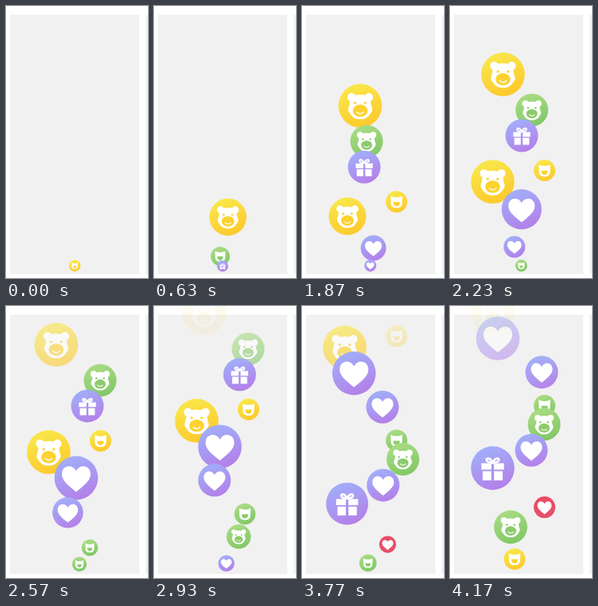
An HTML page for the animation above (4210 ms loop, 178x340 px).

```html
<!DOCTYPE html>
<html lang="en">
<head>
<meta charset="utf-8">
<title>Floating likes</title>
<style>
  html, body { margin: 0; width: 100%; height: 100%; overflow: hidden; background: #fff; }
  svg { display: block; width: 100vw; height: 100vh; }
</style>
</head>
<body>
<svg viewBox="0 0 178 340">
  <defs>
    <g id="bear">
      <g fill="#fff">
        <circle cx="-.4" cy="-.39" r=".19"/>
        <circle cx=".4" cy="-.39" r=".19"/>
        <path d="M-.38-.44Q0-.58.38-.44Q.5-.2.5 0Q.62.2.48.34Q.34.62 0 .62Q-.34.62-.48.34Q-.62.2-.5 0Q-.5-.2-.38-.44Z"/>
      </g>
      <g fill="currentColor">
        <circle cx="-.23" cy="-.13" r=".06"/>
        <circle cx=".23" cy="-.13" r=".06"/>
        <ellipse cy=".23" rx=".34" ry=".28"/>
      </g>
      <path fill="none" stroke="#fff" stroke-width=".05" d="M-.17.28Q0 .46.17.28"/>
    </g>
    <g id="cub">
      <path fill="#fff" d="M-.54-.54L-.3-.44Q0-.38.3-.44L.54-.54L.52.2Q.46.58 0 .58Q-.46.58-.52.2Z"/>
      <path fill="currentColor" d="M-.3.02H.3Q.3.42 0 .42Q-.3.42-.3.02Z"/>
    </g>
    <g id="gift">
      <path fill="#fff" d="M-.52-.22H-.06V.07H-.52ZM.06-.22H.52V.07H.06ZM-.46.14H-.06V.56H-.46ZM.06.14H.46V.56H.06Z"/>
      <path fill="none" stroke="#fff" stroke-width=".1" d="M0-.24C-.1-.5-.32-.48-.28-.35Q-.24-.26 0-.24C.1-.5.32-.48.28-.35Q.24-.26 0-.24Z"/>
    </g>
    <path id="heart" fill="#fff" d="M0 .64C-.22.46-.66.16-.66-.16C-.66-.6-.17-.66 0-.32C.17-.66.66-.6.66-.16C.66.16.22.46 0 .64Z"/>
  </defs>
  <path fill="#f1f1f1" d="M5 11H167V335H5ZM175 11H178V335H175Z"/>
  <g id="stage"></g>
</svg>
<script>
const LOOP = 4210, GROW = 800, SPEED = 0.109, START_R = 7;
const FLOOR = 332, FADE_END = 3000, FADE_TIME = 700, START_X = 86;
const BIG = 27.3, MID = 20.5, SMALL = 13.5;

// gradient start, gradient end, detail color
const colors = {
  yellow: ['#f9e84a', '#fdc82c', '#fdd230'],
  green: ['#aadc84', '#80c766', '#8ccb6c'],
  purple: ['#a0b0fa', '#b47ee8', '#a893f0'],
  red: ['#ec4a62', '#e5506c', '#e84d66']
};

// icon, color, full radius, birth time, then [age, x] points of the sideways drift
const likes = [
  ['bear', 'yellow', BIG, -10, [[620, 92.5], [820, 93], [1130, 86], [1880, 73], [2580, 63]]],
  ['bear', 'green', MID, 336, [[300, 83], [795, 78], [1535, 81], [2235, 118]]],
  ['gift', 'purple', MID, 630, [[500, 79.5], [1240, 78], [1940, 102], [2700, 109]]],
  ['bear', 'yellow', SMALL, 965, [[170, 95.5], [905, 118.5]]],
  ['bear', 'yellow', BIG, 1222, [[648, 57], [1000, 53.5]]],
  ['heart', 'purple', BIG, 1518, [[352, 89.5], [1052, 88], [1812, 75], [2652, 60]]],
  ['heart', 'purple', MID, 1842, [[728, 77.5], [1488, 79.5], [2328, 115]]],
  ['bear', 'green', SMALL, 2162, [[408, 105], [1168, 118.5]]],
  ['bear', 'green', MID, 2440, [[130, 92], [890, 120], [1326, 126.5], [1730, 118]]],
  ['heart', 'purple', MID, 2738, [[592, 99], [1432, 102]]],
  ['gift', 'purple', BIG, 3005, [[320, 71], [1000, 53.5]]],
  ['heart', 'red', SMALL, 3328, [[840, 118.5]]],
  ['bear', 'green', BIG, 3622, [[540, 76]]],
  ['bear', 'yellow', BIG, 3920, [[240, 81]]]
];

const svgNode = (tag, attrs, parent) => {
  const node = document.createElementNS('http://www.w3.org/2000/svg', tag);
  for (const key in attrs) node.setAttribute(key, attrs[key]);
  return parent.appendChild(node);
};
const clamp01 = v => Math.max(0, Math.min(1, v));

const defs = document.querySelector('defs');
for (const name in colors) {
  const grad = svgNode('linearGradient', { id: name, x1: 0.3, y1: 0, x2: 0.7, y2: 1 }, defs);
  svgNode('stop', { offset: 0, 'stop-color': colors[name][0] }, grad);
  svgNode('stop', { offset: 1, 'stop-color': colors[name][1] }, grad);
}

const stage = document.getElementById('stage');
const bubbles = likes.map(([icon, color, size, birth, drift]) => {
  const node = svgNode('g', { color: colors[color][2] }, stage);
  svgNode('circle', { r: 1, fill: `url(#${color})` }, node);
  const face = svgNode('use', { href: '#' + icon }, node);
  return { icon, size, birth, node, face, points: [[0, START_X], ...drift] };
});

// Smooth curve through the points, level at the far end
function driftX(points, age) {
  const last = points.length - 1;
  if (age >= points[last][0]) return points[last][1];
  if (age <= 0) return points[0][1];
  const i = points.findIndex(p => p[0] > age) - 1;
  const slope = k => {
    if (k === last) return 0;
    const a = points[Math.max(0, k - 1)], b = points[k + 1];
    return (b[1] - a[1]) / (b[0] - a[0]);
  };
  const [t0, x0] = points[i], [t1, x1] = points[i + 1];
  const span = t1 - t0, u = (age - t0) / span, v = 1 - u;
  return v * v * (1 + 2 * u) * x0 + u * u * (3 - 2 * u) * x1
    + span * u * v * (v * slope(i) - u * slope(i + 1));
}

function draw(time) {
  for (const b of bubbles) {
    const age = time - b.birth;
    const visible = age >= 0 && age < FADE_END;
    b.node.style.display = visible ? '' : 'none';
    if (!visible) continue;
    const r = START_R + (b.size - START_R) * clamp01(age / GROW);
    const bottom = Math.min(FLOOR, FLOOR + 25 - SPEED * age);
    const x = driftX(b.points, age);
    b.node.setAttribute('transform', `translate(${x} ${bottom - r}) scale(${r})`);
    b.node.setAttribute('opacity', clamp01((FADE_END - age) / FADE_TIME));
    if (b.icon === 'bear') b.face.setAttribute('href', r < 14 ? '#cub' : '#bear');
  }
}

const begin = performance.now();
function tick() {
  draw((performance.now() - begin) % LOOP);
  requestAnimationFrame(tick);
}
tick();
</script>
</body>
</html>
```
